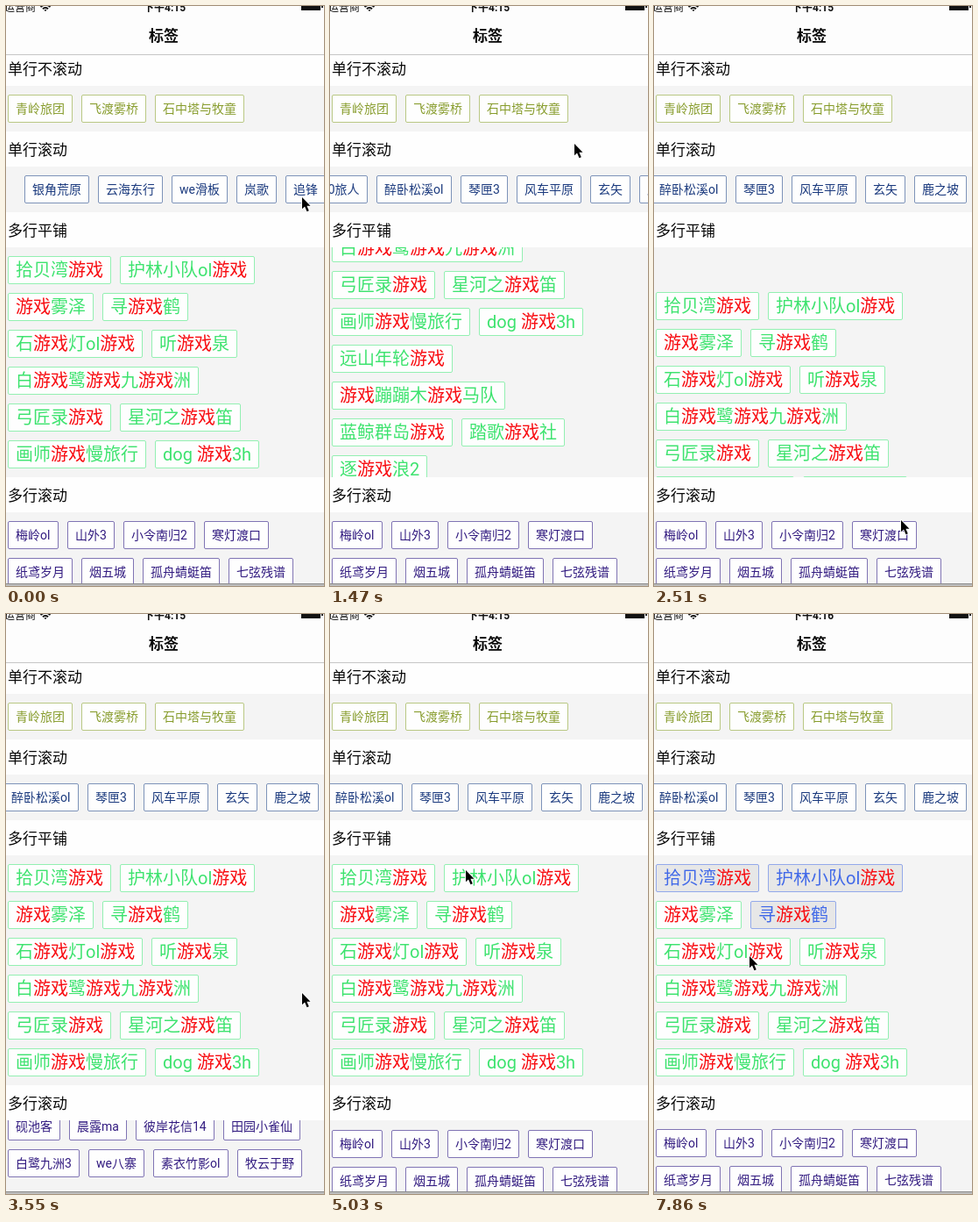
An HTML page with a canvas that plays this animation: 363x661 px, repeating every 8 s.

```html
<!DOCTYPE html>
<html lang="zh-CN">
<head>
<meta charset="utf-8">
<style>
html, body { margin: 0; width: 100%; height: 100%; overflow: hidden; background: #f4f4f4; }
canvas { display: block; width: 363px; height: 661px; }
</style>
</head>
<body>
<canvas id="stage" width="363" height="661"></canvas>
<script>
const W = 363, H = 661, LOOP = 8000, TICK = 148;
const ctx = document.getElementById('stage').getContext('2d');
const FONT = 'Roboto, "Noto Sans CJK SC", "Noto Sans CJK", sans-serif';
const KEY = '游戏';

const OLIVE = { text: '#879c2c', line: '#b9c884', size: 14 };
const NAVY = { text: '#1b3a7e', line: '#7d93b9', size: 14 };
const GREEN = { text: '#3ee36f', line: '#93f0b2', size: 20 };
const PURPLE = { text: '#321b80', line: '#8074b4', size: 14 };
const PICKED = { text: '#4169e8', line: '#93a9ea', size: 20, fill: '#e7e7e7' };

const fixedTags = [['青岭旅团', '飞渡雾桥', '石中塔与牧童']];
const stripTags = [['银角荒原', '云海东行', 'we滑板', '岚歌', '追锋', '700旅人',
  '醉卧松溪ol', '琴匣3', '风车平原', '玄矢', '鹿之坡']];
const wallTags = [
  ['拾贝湾游戏', '护林小队ol游戏'],
  ['游戏雾泽', '寻游戏鹤'],
  ['石游戏灯ol游戏', '听游戏泉'],
  ['白游戏鹭游戏九游戏洲'],
  ['弓匠录游戏', '星河之游戏笛'],
  ['画师游戏慢旅行', 'dog 游戏3h'],
  ['远山年轮游戏'],
  ['游戏蹦蹦木游戏马队'],
  ['蓝鲸群岛游戏', '踏歌游戏社'],
  ['逐游戏浪2']
];
const listTags = [
  ['梅岭ol', '山外3', '小令南归2', '寒灯渡口'],
  ['纸鸢岁月', '烟五城', '孤舟蜻蜓笛', '七弦残谱'],
  ['砚池客', '晨露ma', '彼岸花信14', '田园小雀仙'],
  ['白鹭九洲3', 'we八寨', '素衣竹影ol', '牧云于野']
];
const picks = { '拾贝湾游戏': 41, '护林小队ol游戏': 47, '寻游戏鹤': 50 };

// Key points of each gesture: tick, then position
const wallKeys = [[8, 0], [11, 204], [17, -41], [21, 0]];
const listKeys = [[20, 0], [23, 103], [29, 103], [32, -4], [35, 0]];
const pointerKeys = [[0, 338, 218], [3, 190, 215], [8, 283, 488], [10, 279, 157],
  [17, 282, 586], [20, 300, 643], [24, 338, 432], [30, 317, 640], [34, 155, 292],
  [38, 88, 300], [42, 88, 300], [45, 187, 309], [47, 187, 309], [49, 168, 340], [53, 109, 390]];

// Eased position between the key points around tick k
function ease(keys, k) {
  const next = keys.findIndex(p => p[0] > k);
  if (next <= 0) return keys.at(next).slice(1);
  const a = keys[next - 1], b = keys[next];
  const u = (k - a[0]) / (b[0] - a[0]);
  const s = u * u * (3 - 2 * u);
  return a.slice(1).map((v, i) => v + (b[i + 1] - v) * s);
}

// Flicked strip that slows down to rest at tick 17
const stripX = k => -437 + 458 * Math.max(0, 1 - k / 17) ** 2.37;

function box(x, y, w, h, color) {
  ctx.fillStyle = color;
  ctx.fillRect(x, y, w, h);
}

function label(text, x, y, size, color, weight = 400) {
  ctx.font = `${weight} ${size}px ${FONT}`;
  ctx.fillStyle = color;
  ctx.fillText(text, x, y);
  return ctx.measureText(text).width;
}

function tag(text, x, y, style) {
  const parts = text.split(/(游戏)/).filter(Boolean);
  ctx.font = `400 ${style.size}px ${FONT}`;
  const w = 18 + Math.round(0.2 + parts.reduce((sum, p) => sum + ctx.measureText(p).width, 0));
  if (x < W && x + w > 0) {
    ctx.beginPath();
    ctx.roundRect(x + 0.5, y + 0.5, w - 1, 31, 1.5);
    ctx.fillStyle = style.fill || '#fefefe';
    ctx.fill();
    ctx.strokeStyle = style.line;
    ctx.lineWidth = 1;
    ctx.stroke();
    let tx = x + 9;
    for (const p of parts) {
      tx += label(p, tx, y + 16 + style.size * 0.37, style.size, p === KEY ? '#f80d12' : style.text);
    }
  }
  return w;
}

function panel(top, bottom, rows, style, k, x0 = 2, scroll = 0) {
  ctx.save();
  ctx.beginPath();
  ctx.rect(0, top, W, bottom - top);
  ctx.clip();
  rows.forEach((row, i) => {
    const y = Math.round(top + 10 + i * 42 - scroll);
    let x = Math.round(x0);
    for (const name of row) x += tag(name, x, y, k >= picks[name] ? PICKED : style) + 10;
  });
  ctx.restore();
}

function heading(text, top) {
  box(0, top, W, 40, '#fefefe');
  label(text, 2, top + 26.5, 17, '#080808');
}

function navBar(k) {
  box(0, 0, W, 55, '#fdfdfd');
  box(0, 55, W, 1, '#c6c6c6');
  label('运营商', -2, 6, 12, '#111');
  label(k >= 50 ? '下午4:16' : '下午4:15', 157, 6, 12, '#111', 700);
  ctx.strokeStyle = '#111';
  ctx.lineWidth = 1.8;
  for (const r of [1, 4, 7.2]) {
    ctx.beginPath();
    ctx.arc(45, 6, r, -Math.PI * 0.77, -Math.PI * 0.23);
    ctx.stroke();
  }
  box(337, 0, 22, 5, '#111');
  box(360, 0, 2, 2, '#111');
  ctx.textAlign = 'center';
  label('标签', 180, 40, 17, '#080808', 700);
  ctx.textAlign = 'left';
}

function arrow(x, y) {
  ctx.save();
  ctx.translate(Math.round(x), Math.round(y));
  ctx.scale(0.95, 0.95);
  const shape = new Path2D('M0 0V14L3.2 11L5.8 17L8.2 16L5.7 10.2H10Z');
  ctx.lineJoin = 'round';
  ctx.lineWidth = 1.8;
  ctx.strokeStyle = '#fff';
  ctx.stroke(shape);
  ctx.fillStyle = '#000';
  ctx.fill(shape);
  ctx.restore();
}

function draw(t) {
  // The picture advances in even ticks
  const k = Math.floor((t + 12) / TICK);
  box(0, 0, W, H, '#f4f4f4');
  heading('单行不滚动', 51);
  heading('单行滚动', 143);
  heading('多行平铺', 235);
  heading('多行滚动', 537);
  navBar(k);
  panel(91, 143, fixedTags, OLIVE, k);
  panel(183, 235, stripTags, NAVY, k, stripX(k));
  panel(275, 537, wallTags, GREEN, k, 2, ease(wallKeys, k)[0]);
  panel(577, 658, listTags, PURPLE, k, 2, ease(listKeys, k)[0]);
  box(0, 658, W, 1, '#8c8c8c');
  box(0, 659, W, 2, '#bdbdbd');
  arrow(...ease(pointerKeys, k));
}

const start = performance.now();
function frame() {
  draw((performance.now() - start) % LOOP);
  requestAnimationFrame(frame);
}
frame();
</script>
</body>
</html>
```
